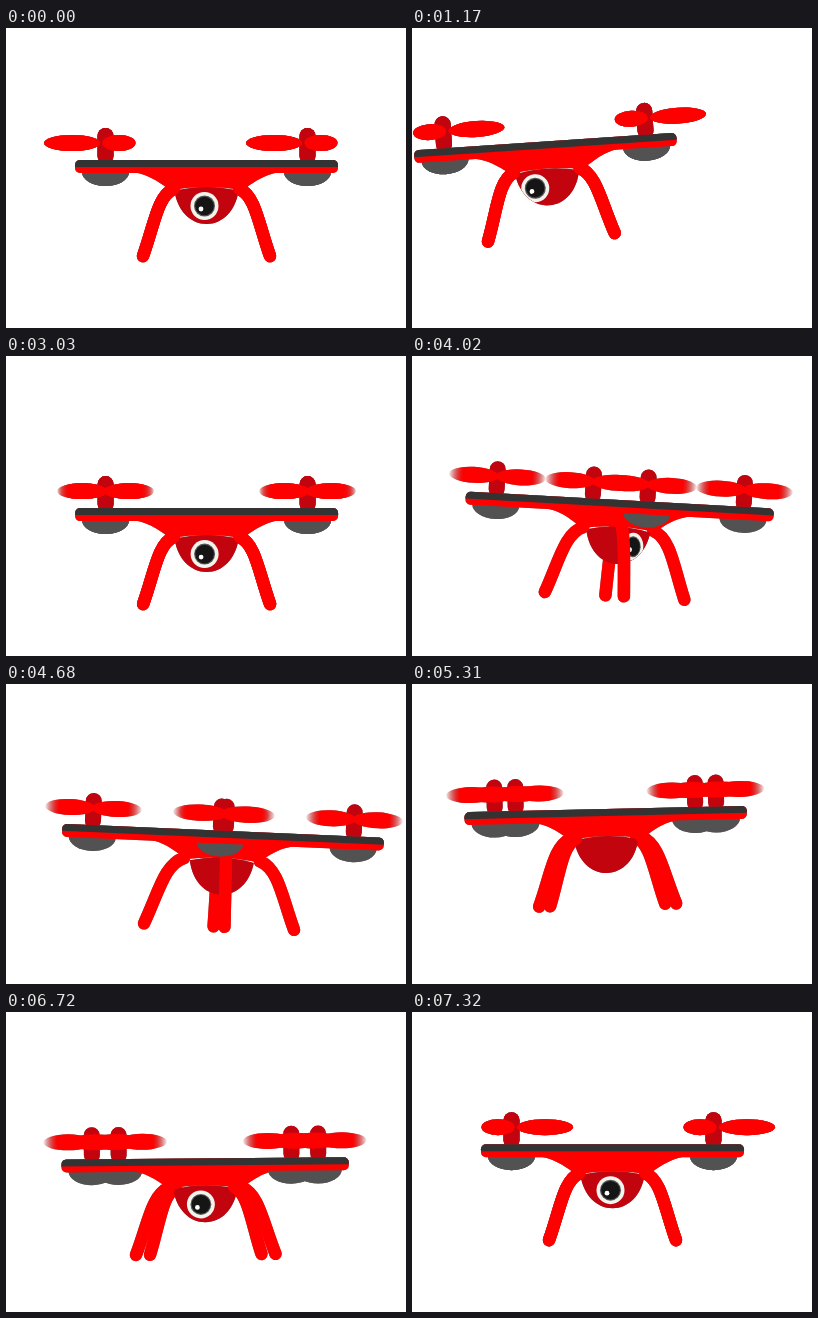
Animation, 400 px wide and 300 px high, one loop 7350 ms. Source, as an HTML page with a canvas:

```html
<!DOCTYPE html>
<html lang="en">
<head>
<meta charset="utf-8">
<title>Drone</title>
<style>
html, body { margin: 0; width: 100%; height: 100%; overflow: hidden; background: #fff; }
canvas { display: block; filter: drop-shadow(0 0 .6px #777); }
</style>
</head>
<body>
<canvas id="stage" width="400" height="300"></canvas>
<script>
const ctx = document.getElementById('stage').getContext('2d');
const LOOP = 7350, STEP = 30;
const RED = '#ff0000', DARK_RED = '#c2040f', PLATE = '#333333', MOTOR = '#525252';

// time, x, y, roll (degrees), yaw (degrees)
const keys = [
  [0, 0, 0, 0, 0],
  [780, -34, -10, -2.2, 0],
  [1170, -67.5, -18.5, -3.8, 0],
  [1560, -8, -27, -0.5, 0],
  [1800, 36, -26, 2.5, 0],
  [2070, 70, -14, 4.4, 0],
  [2310, 38, 9, 3, 0],
  [2700, 4, 28, 0, 0],
  [3060, 0, 19, 0, 0],
  [3450, 0, 2, 0, 0],
  [3780, 2, 3, 1, 14],
  [4020, 7.5, 12, 3.2, 61.5],
  [4560, 19, 17, 3, 118],
  [5310, -7, -7, -1.3, 187],
  [5850, -16, -27, -3, 248],
  [6210, -15, -15, -3.8, 286],
  [6500, -7, 2, -2, 328],
  [6800, 0, 17, 0, 357],
  [7000, 0, 12, 0, 360],
  [LOOP, 0, 0, 0, 360]
];

function slope(i, c) {
  if (i === 0 || i === keys.length - 1) return 0;
  const a = keys[i - 1], b = keys[i + 1];
  return (b[c] - a[c]) / (b[0] - a[0]);
}

// Cubic Hermite interpolation through the keys
function pose(t) {
  let i = 0;
  while (i < keys.length - 2 && t >= keys[i + 1][0]) i++;
  const a = keys[i], b = keys[i + 1], span = b[0] - a[0];
  const u = (t - a[0]) / span, v = 1 - u;
  return [1, 2, 3, 4].map(c =>
    a[c] * v * v * (1 + 2 * u) + b[c] * u * u * (3 - 2 * u) +
    span * u * v * (v * slope(i, c) - u * slope(i + 1, c)));
}

function fill(color, draw) {
  ctx.beginPath();
  draw();
  ctx.fillStyle = color;
  ctx.fill();
}

const ellipse = (color, x, y, rx, ry = rx, end = 2 * Math.PI) =>
  fill(color, () => ctx.ellipse(x, y, rx, ry, 0, 0, end));

const box = (color, x, y, w, h, r) => fill(color, () => ctx.roundRect(x, y, w, h, r));

function leg(turn, sx, sz) {
  const [x0, x1, x2, x3] = [[33, 22], [49, 34], [52, 37], [63.5, 45]]
    .map(([x, z]) => turn(sx * x, sz * z).x);
  ctx.beginPath();
  ctx.moveTo(x0, 29);
  ctx.bezierCurveTo(x1, 36, x2, 64, x3, 96);
  ctx.strokeStyle = RED;
  ctx.lineWidth = 12.5;
  ctx.lineCap = 'round';
  ctx.stroke();
}

function propeller(x, side, blurred) {
  if (blurred) {
    const fade = ctx.createLinearGradient(x - 49, 0, x + 49, 0);
    fade.addColorStop(0, '#ff000000');
    fade.addColorStop(0.15, RED);
    fade.addColorStop(0.85, RED);
    fade.addColorStop(1, '#ff000000');
    ellipse(fade, x - 23.5, -17, 25, 8);
    ellipse(fade, x + 23.5, -17, 25, 8);
  } else {
    ellipse(RED, x + side * 33.5, -17, 28, 8);
    ellipse(RED, x - side * 13.5, -17, 16.5, 8);
  }
}

function dome() {
  ctx.beginPath();
  ctx.moveTo(-32, 31);
  ctx.quadraticCurveTo(0, 23, 32, 31);
  ctx.bezierCurveTo(29, 51, 16, 64, 0, 64);
  ctx.bezierCurveTo(-16, 64, -29, 51, -32, 31);
  ctx.closePath();
}

function eye(yaw, gaze) {
  const angle = yaw - 0.38 * Math.sin(yaw), squash = Math.cos(angle);
  if (squash <= 0) return;
  ctx.save();
  dome();
  ctx.clip();
  ctx.translate(gaze - 2 + 26 * Math.sin(angle), 46);
  ctx.scale(squash, 1);
  ellipse('#f4f4ee', 0, 0, 14);
  ellipse('#555555', 0, 0, 10.5);
  ellipse('#151515', 0, 0, 9.3);
  ellipse('#ffffff', -3.5, 3, 2.4);
  ctx.restore();
}

function body() {
  fill(RED, () => {
    ctx.moveTo(-82, 11);
    ctx.bezierCurveTo(-58, 13, -50, 21, -36, 30);
    ctx.quadraticCurveTo(0, 24, 36, 30);
    ctx.bezierCurveTo(50, 21, 58, 13, 82, 11);
  });
}

function draw(t) {
  const [dx, dy, roll, degrees] = pose(t);
  const yaw = degrees * Math.PI / 180, cos = Math.cos(yaw), sin = Math.sin(yaw);
  const turn = (x, z) => ({ x: x * cos + z * sin, depth: z * cos - x * sin });
  const corners = [[-1, -1], [1, -1], [-1, 1], [1, 1]].map(([sx, sz]) =>
    ({ sx, sz, ...turn(sx * 101, sz * 86) })).sort((a, b) => a.depth - b.depth);
  const far = corners.slice(0, 2), near = corners.slice(2);
  const half = Math.max(...corners.map(c => c.x)) + 30.5;
  const side = (t / STEP - 1) % 4 < 2 ? -1 : 1;
  const blurred = t > 1500 && t < 6800;
  const motor = c => ellipse(MOTOR, c.x, 12, 23.5, 14, Math.PI);
  const support = c => leg(turn, c.sx, c.sz);

  ctx.clearRect(0, 0, 400, 300);
  ctx.save();
  ctx.translate(200.5 + dx, 132 + dy);
  ctx.rotate(roll * Math.PI / 180);

  corners.forEach(c => box(DARK_RED, c.x - 8, -32, 16, 36, 8));
  corners.forEach(c => propeller(c.x, side, blurred));
  far.forEach(motor);
  far.forEach(support);
  body();
  dome();
  ctx.fillStyle = DARK_RED;
  ctx.fill();
  eye(yaw, t < 3000 ? dx * 0.16 : 0);
  near.forEach(support);
  near.forEach(motor);
  box(RED, -half, 0, 2 * half, 13, 5);
  box(PLATE, -half, 0, 2 * half, 7, [5, 5, 0, 0]);
  ctx.restore();
}

const start = performance.now();
function tick() {
  const t = Math.floor((performance.now() - start) % LOOP / STEP) * STEP;
  draw(t < 60 ? 0 : t);
  requestAnimationFrame(tick);
}
tick();
</script>
</body>
</html>
```
